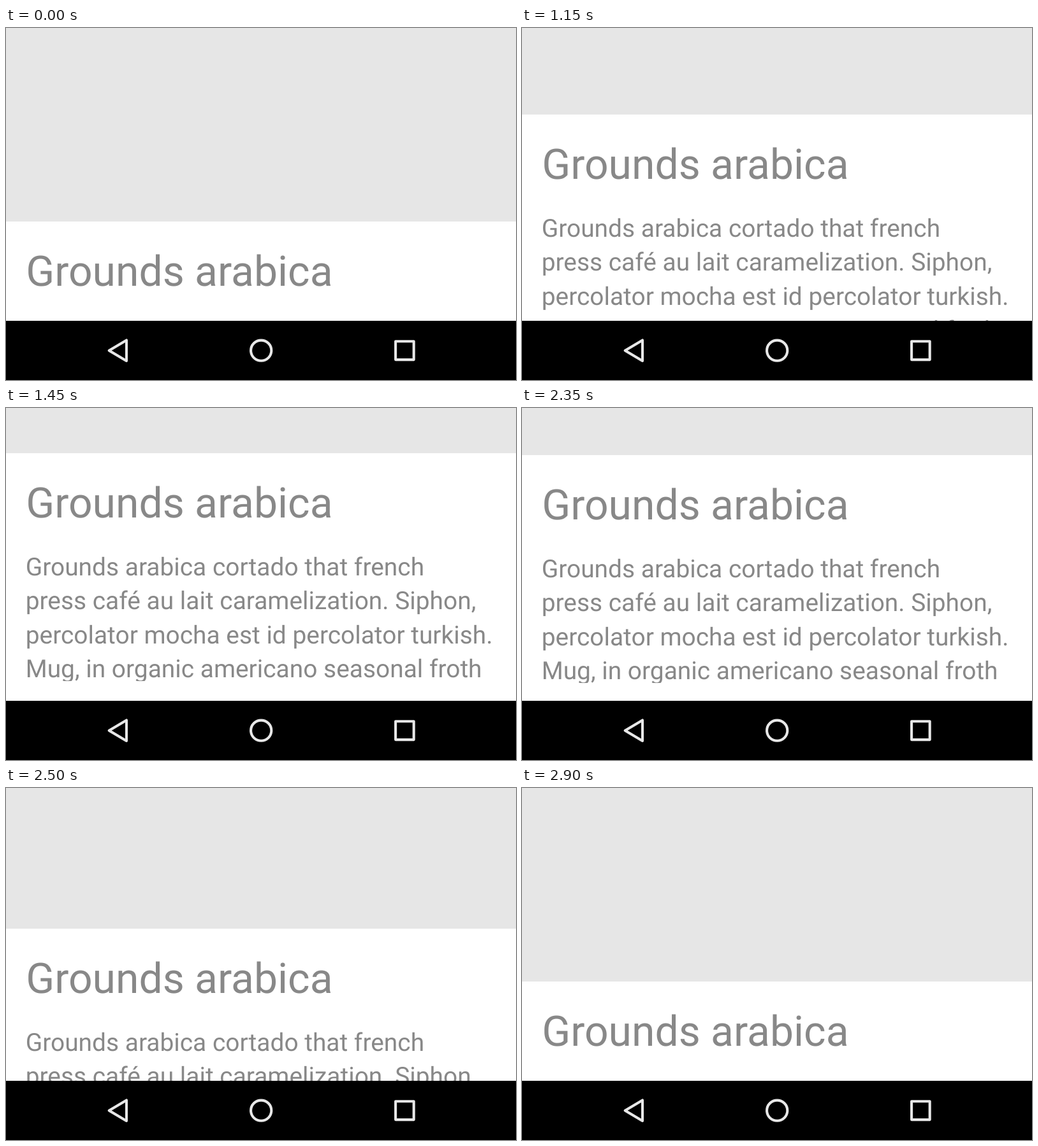
An HTML page for the animation above (3100 ms loop, 800 by 553 pixels).

```html
<!DOCTYPE html>
<html lang="en">
<head>
<meta charset="utf-8">
<title>Bottom sheet</title>
<style>
  html, body { margin: 0; width: 100%; height: 100%; overflow: hidden; background: #e6e6e6; }
  svg { display: block; width: 800px; height: 553px; }
  text { font-family: Roboto, sans-serif; fill: #888; text-rendering: geometricPrecision; }
  .title { font-size: 66px; }
  .body { font-size: 38.9px; }
  .icons { fill: none; stroke: #e8e8e8; stroke-width: 4.1; stroke-linejoin: round; }
</style>
</head>
<body>
<svg viewBox="0 0 800 553">
  <clipPath id="content"><rect width="800" height="358"/></clipPath>
  <g id="sheet">
    <rect width="800" height="553" fill="#fff"/>
    <text class="title" x="31.3" y="101">Grounds arabica</text>
    <g class="body" clip-path="url(#content)">
      <text x="30.7" y="192">Grounds arabica cortado that french</text>
      <text x="30.7" y="245.4">press café au lait caramelization. Siphon,</text>
      <text x="30.7" y="298.8">percolator mocha est id percolator turkish.</text>
      <text x="30.7" y="352.2">Mug, in organic americano seasonal froth</text>
    </g>
  </g>
  <rect y="460" width="800" height="93" fill="#000"/>
  <g class="icons">
    <path d="M161.7 506.7L189 490.5V522.9Z"/>
    <circle cx="400.2" cy="506.7" r="16.1"/>
    <rect x="611.1" y="492.3" width="28.6" height="28.8"/>
  </g>
</svg>
<script>
const LOOP = 3100, TICK = 50, LOW = 304, HIGH = 71;
const sheet = document.getElementById("sheet");

// Decelerating progress from 0 to 1
function settle(t, start, duration, power) {
  const u = Math.min(1, Math.max(0, (t - start) / duration));
  return 1 - (1 - u) ** power;
}

function sheetTop(t) {
  const open = settle(t, 1036.3, 505, 5) - settle(t, 2347.8, 596, 3.5);
  return LOW + (HIGH - LOW) * open;
}

function draw(now) {
  const t = Math.floor((now % LOOP) / TICK) * TICK;
  sheet.setAttribute("transform", `translate(0 ${Math.round(sheetTop(t))})`);
  requestAnimationFrame(draw);
}

draw(0);
</script>
</body>
</html>
```
